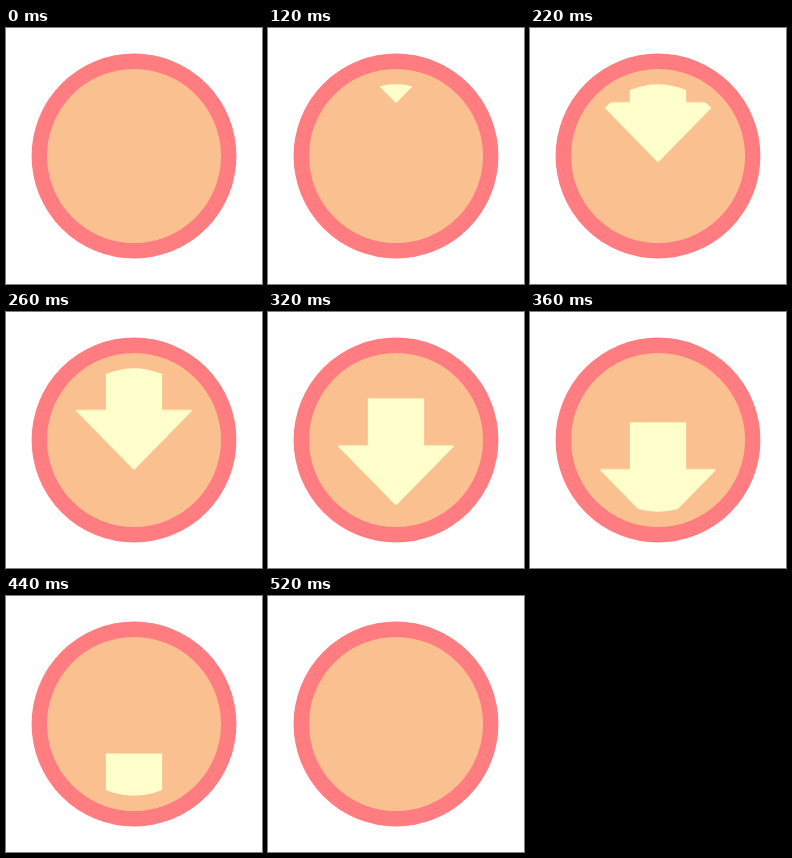
These frames come from a looping animation (256 px wide and 256 px high, 0.6 s). An HTML page:

```html
<!DOCTYPE html>
<html lang="en">
<head>
<meta charset="utf-8">
<title>Download loader</title>
<style>
  html, body { margin: 0; width: 100%; height: 100%; overflow: hidden; background: #fff; }
  svg { display: block; width: 100vw; height: 100vh; }
</style>
</head>
<body>
<svg viewBox="0 0 256 256">
  <clipPath id="window"><circle cx="128" cy="128" r="71.7"/></clipPath>
  <circle cx="128" cy="128" r="94.72" fill="#fac090" stroke="#ff7c81" stroke-width="15.36"/>
  <g clip-path="url(#window)">
    <path id="arrow" fill="#ffffcb" d="M99.84 74.4 H156.16 V121.4 H185
      Q187 121.4 185.5 123 L129.2 180.6 Q128 181.8 126.8 180.6
      L70.5 123 Q69 121.4 71 121.4 H99.84 Z"/>
  </g>
</svg>
<script>
  const LOOP = 600, STEP = 20, TRAVEL = 177.6;

  // The arrow falls at constant speed, centred halfway through the loop.
  document.getElementById('arrow').animate(
    [{ transform: `translateY(${-TRAVEL}px)` }, { transform: `translateY(${TRAVEL}px)` }],
    { duration: LOOP, iterations: Infinity, easing: `steps(${LOOP / STEP}, end)` }
  );
</script>
</body>
</html>
```
